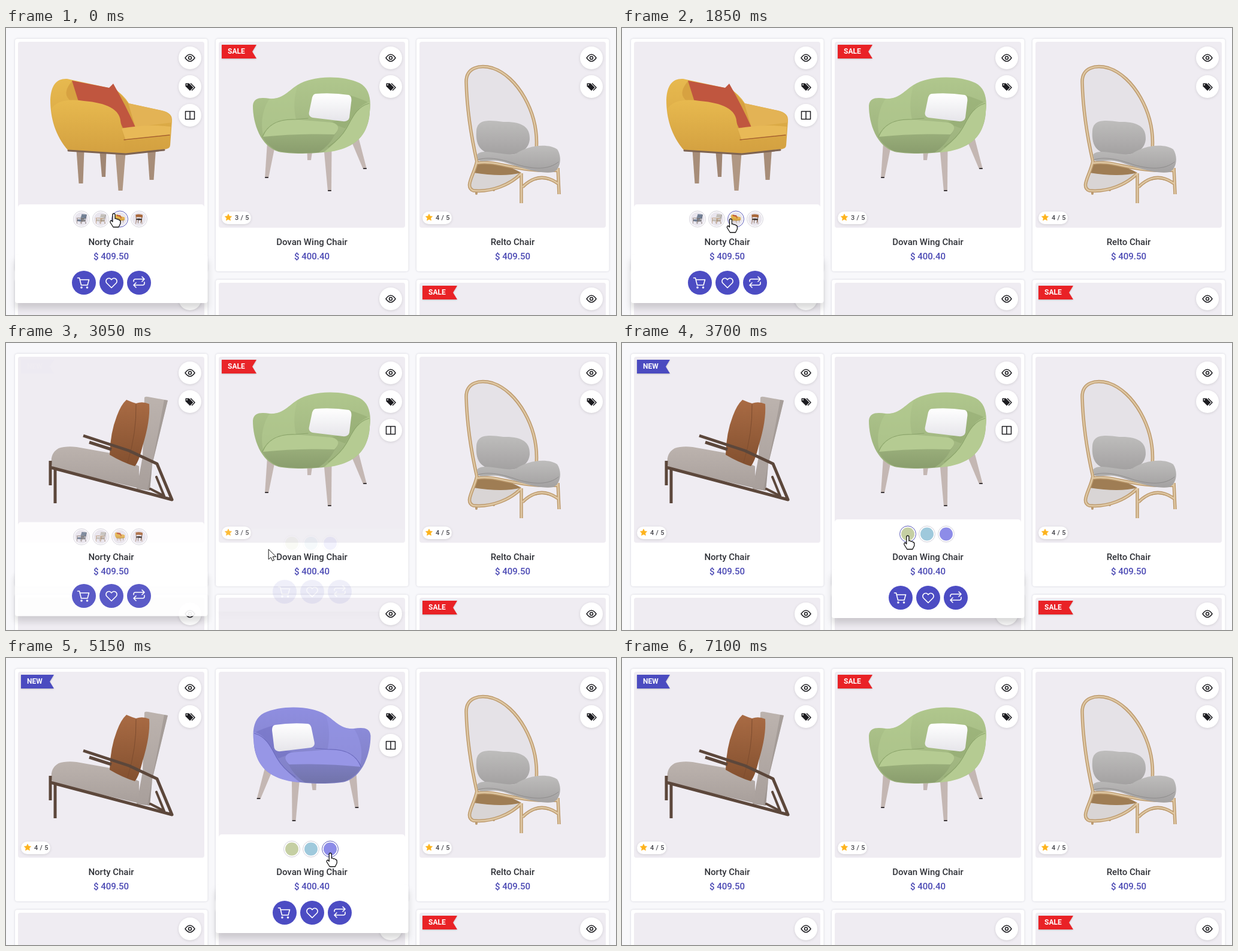
These frames come from a looping animation (1018 by 480 pixels, 7150 ms). An HTML page:

```html
<!DOCTYPE html>
<html lang="en">
<head>
<meta charset="utf-8">
<title>Chair shop</title>
<style>
html, body { margin: 0; width: 100%; height: 100%; overflow: hidden; background: #f8f8fb; }
svg { display: block; font-family: Roboto, Arial, sans-serif; font-weight: 500; }
.card { fill: #fff; filter: drop-shadow(0 0 1.5px rgba(40,40,70,.2)); }
.photo { fill: #efecf2; }
.round { fill: #fff; filter: drop-shadow(0 1px 2px rgba(0,0,0,.12)); }
.sheet { fill: #fff; filter: drop-shadow(0 9px 6px rgba(0,0,0,.15)); }
.line { fill: none; stroke: #1c1c20; stroke-width: 1.5; stroke-linejoin: round; }
.white { fill: none; stroke: #fff; stroke-width: 1.6; stroke-linecap: round; stroke-linejoin: round; }
.ribbon text { font-size: 12px; font-weight: 700; fill: #fff; }
.ribbon path { filter: drop-shadow(0 1px 1px rgba(0,0,0,.2)); }
.label { font-size: 15px; text-anchor: middle; fill: #303238; }
.price { fill: #4b49b4; }
.score { font-size: 11px; fill: #45454b; letter-spacing: .3px; }
</style>
</head>
<body>
<svg id="stage" width="1018" height="480" viewBox="0 0 1018 480"></svg>
<script>
const LOOP = 7150;
const path = (d, fill, extra = '') => `<path d="${d}" fill="${fill}" ${extra}/>`;
const stroke = (d, color, width, cap = 'round') =>
  path(d, 'none', `stroke="${color}" stroke-width="${width}" stroke-linejoin="round" stroke-linecap="${cap}"`);
const leg = (x1, y1, w1, x2, y2, w2, fill) =>
  path(`M${x1 - w1 / 2} ${y1}h${w1}L${x2 + w2 / 2} ${y2}h${-w2}z`, fill);
const grad = (id, a, b, dir = 'x2="0" y2="1"') =>
  `<linearGradient id="${id}" ${dir}><stop stop-color="${a}"/><stop offset="1" stop-color="${b}"/></linearGradient>`;
const group = (id, body, extra = '') => `<g id="${id}" ${extra}>${body}</g>`;
const textured = (d, fill, texture) => path(d, fill) + path(d, `url(#${texture})`);

// Chairs, drawn at their place on the stage
const lounge = () =>
  path('M231 91Q233 89 237 90L270 96 244 203 240 247 218 244 228 190z', 'url(#fabric)') +
  path('M264 95L270 96 244 203 240 247 236 246z', '#948b88', 'opacity=".5"') +
  stroke('M251 224L264 256 241 244', '#5c473b', 4) +
  path('M76 200Q74 184 88 176Q100 172 118 174L174 184Q205 198 222 206V243L85 211Q76 209 76 200z', 'url(#fabric)') +
  path('M201 95Q210 99 217 101Q228 97 239 102Q241 130 228 172Q222 198 215 206Q195 200 173 187Q174 150 185 122Q192 103 201 95z', 'url(#leather)') +
  stroke('M217 103Q218 150 203 200', '#7d4c2f', 1) +
  stroke('M139 166L176 178M129 155L205 180 252 202 277 262 74 208M74 197V238M82 210V268', '#5c473b', 5, 'butt');

const armchair = (cloth, soft, wood, dark) =>
  stroke('M280 93L262 180 251 226 264 278M150 228L165 276', dark, 6, 'butt') +
  textured('M182 76L276 82Q283 84 281 92L264 172 160 168 178 82Q179 76 182 76z', cloth, 'weave') +
  path('M276 82Q284 84 282 92L266 172 258 171z', '#39465c', 'opacity=".4"') +
  textured('M162 128Q198 136 238 137Q237 165 230 190Q190 191 158 181Q158 150 162 128z', soft, 'weave') +
  stroke('M158 181Q156 150 162 128Q198 136 238 137L232 165', '#4b596e', 1) +
  textured('M84 192Q90 185 112 185L178 187 256 190 251 229 178 231 88 223Q81 208 84 192z', cloth, 'weave') +
  path('M186 193L256 191 251 229 180 231z', '#9c8570', 'opacity=".45"') +
  leg(88, 160, 13, 79, 279, 6, wood) + leg(184, 164, 17, 174, 279, 7, wood) +
  leg(181, 178, 3, 172, 279, 2, dark) + leg(263, 230, 1, 264, 279, 6, dark) +
  path('M68 157Q74 151 128 152L163 157 150 164Q98 157 70 162z', wood) +
  path('M162 163Q200 155 250 161Q249 170 236 173Q200 168 162 167z', wood) +
  stroke('M69 161Q100 156 150 164M163 167Q200 168 236 172', dark, 1.5);

const sunny = () =>
  leg(124, 204, 13, 125, 260, 7, '#a78d79') + leg(162, 208, 11, 163, 249, 6, '#a08673') +
  leg(191, 209, 17, 191, 272, 7, '#b09783') + leg(243, 203, 14, 243, 254, 7, '#a78d79') +
  path('M74 120C75 95 85 84 102 85L180 102Q195 110 205 126L255 137Q278 140 277 155L274 196Q274 203 262 203L200 211 104 205C82 180 74 150 74 120z', 'url(#gold)') +
  path('M110 89L185 104 204 126 222 166 195 170Q160 128 108 122Q92 110 110 89z', '#d7a241') +
  path('M110 88L172 100 179 93Q200 130 216 166L195 167 185 145Q150 125 121 123z', '#c0563f') +
  path('M204 126L255 137Q277 141 277 158L216 166z', '#e3b355') +
  path('M193 168Q240 160 275 165L274 179 200 188z', '#e8b957') +
  stroke('M197 187L273 179', '#a5602f', 1.5) +
  path('M76 135Q88 116 130 122Q188 127 191 155L200 211 104 205Q80 175 76 135z', 'url(#gold)') +
  stroke('M104 205L200 211 264 204', '#7d6352', 3);

const diner = () =>
  leg(120, 185, 12, 108, 280, 7, '#7d4f30') + leg(225, 185, 12, 238, 280, 7, '#7d4f30') +
  leg(160, 195, 12, 155, 270, 7, '#5d3b26') + leg(245, 110, 12, 205, 265, 7, '#5d3b26') +
  path('M104 86Q175 70 250 92L244 146Q175 130 110 140z', '#a9683a') +
  path('M110 172Q175 155 240 174L232 198Q170 208 112 192z', '#3a3230') +
  leg(112, 130, 9, 118, 180, 9, '#7d4f30');

const wing = (main, light, dark, wood) => {
  const shell = 'M412 130C413 116 425 116 440 118C462 120 472 104 487 95C510 80 560 78 590 92C606 100 610 120 607 140C606 165 595 185 575 196C545 212 480 212 455 207C425 198 412 160 412 130z';
  return leg(443, 192, 14, 435, 251, 6, wood) + leg(507, 204, 9, 506, 221, 6, wood) +
    leg(537, 202, 13, 540, 273, 6, wood) + leg(582, 186, 14, 599, 236, 6, wood) +
    stroke('M433 250h4M538 272h4M597 235h4', '#3a3538', 2) +
    path(shell, main) + path(shell, 'url(#shade)') +
    path('M440 118C462 120 472 104 487 95C480 115 480 135 484 153C455 152 440 162 430 182C424 160 428 135 440 118z', light, 'opacity=".6"') +
    path('M572 112Q592 118 604 124C585 132 578 150 566 168L540 158 573 150z', dark, 'opacity=".45"') +
    path('M428 182C436 162 455 152 482 153L545 158Q562 164 548 180Q540 196 522 208Q480 211 455 206Q436 198 428 182z', 'url(#shade)') +
    path('M428 182C436 162 455 152 482 153L545 158Q562 164 548 178Q490 176 428 182z', light) +
    path('M607 124C585 131 578 150 568 168C556 186 545 196 530 208C565 206 590 192 600 170C607 152 608 138 607 124z', light) +
    stroke('M428 182C436 162 455 152 482 153L504 151M606 126C585 132 578 150 568 168C560 182 548 192 538 199', dark, 1.2) +
    path('M517 110Q545 108 572 112Q578 114 576 125L573 150Q571 157 562 156L512 150Q504 148 506 140L511 116Q513 110 517 110z', 'url(#linen)');
};

const rattan = () => {
  const hoop = 'M786 224C776 180 769 130 768 90C768 66 790 61 812 67C852 80 890 140 885 204';
  const loop = 'M786 222C782 245 764 266 780 272C810 275 842 262 860 243';
  const rail = 'M786 226C820 220 850 242 921 238';
  const feet = 'M860 243V293M921 234L923 278M862 266Q890 238 921 260';
  const cane = [hoop, loop, rail, feet].join('');
  return stroke('M785 270v7M814 267v4', '#bb9a70', 4) +
    path(hoop, '#e5e2e7') + path(loop, '#d9d5d5') +
    path('M786 226Q815 218 860 242Q830 250 780 242z', '#9f7d54') +
    path('M785 172C787 152 805 154 830 157C860 156 875 165 874 186C872 208 850 214 825 212C795 212 783 200 785 172z', 'url(#grey)') +
    stroke(cane, '#bd9a6d', 5.5, 'butt') + stroke(cane, '#dfc8a4', 2.5, 'butt') +
    path('M786 212C795 200 830 214 850 211C870 196 905 192 920 203C928 215 926 235 914 241C890 245 855 232 830 224C810 218 795 226 788 221z', 'url(#grey)') +
    stroke('M788 220C810 214 835 222 855 229C880 236 905 238 922 224', '#8f8d8d', 1);
};

const flip = 'transform="matrix(-1 0 0 1 1020.5 0)"';
const defs = `<defs>
  ${grad('fabric', '#bcb3ae', '#a89f9b')}${grad('leather', '#a96b44', '#83502f')}
  ${grad('gold', '#e7b94f', '#d3a040')}${grad('linen', '#fff', '#e6e5ea')}${grad('grey', '#bebdbc', '#a3a1a1')}
  ${grad('denim', '#77869b', '#66758c')}${grad('cushion', '#8491a4', '#687689')}
  ${grad('shade', 'rgba(30,40,20,0)', 'rgba(30,40,20,.14)')}
  <pattern id="weave" width="7" height="9" patternUnits="userSpaceOnUse" patternTransform="rotate(4)">
    <path d="M1 0v5M4.500 4v5" stroke="#a08a80" opacity=".4"/><path d="M2.500 3v6M6 0v4" stroke="#485c7a" opacity=".4"/></pattern>
  ${group('lounge', lounge())}${group('sunny', sunny())}${group('diner', diner())}${group('rattan', rattan())}
  ${group('denimChair', armchair('url(#denim)', 'url(#cushion)', '#84736a', '#5d4f49'))}
  ${group('creamChair', armchair('#c9c4bc', '#dfdad3', '#b58e68', '#8d6a4b'))}
  ${group('green', wing('#b0c78d', '#b5cb92', '#8ca56b', '#c4b7b3'))}
  ${group('blue', wing('#8bbbd8', '#92c2de', '#6296b8', '#b3cdbf'), flip)}
  ${group('purple', wing('#8f8ee0', '#9796e6', '#6a69bd', '#c4b7b3'), flip)}
  <path id="eye" class="line" d="M-8 0Q0-11.500 8 0Q0 11.500-8 0zM2.500 0A2.500 2.500 0 1 1-2.500 0A2.500 2.500 0 1 1 2.500 0z"/>
  <g id="tags"><path d="M-7.500-5.500h6l7 7-5.500 5.500-7.500-7.500z" fill="#1c1c20"/><circle cx="-5" cy="-3" r="1.100" fill="#fff"/>
    <path class="line" d="M1-5.500l7 7-5 5"/></g>
  <path id="columns" class="line" d="M-7.500-6.500h15v13h-15zM0-6.500v13"/>
  <path id="cart" class="white" d="M-10.500-8h3l3 12H6l2.500-9H-6.500M-3 8a1 1 0 1 1-2 0a1 1 0 1 1 2 0M6.500 8a1 1 0 1 1-2 0a1 1 0 1 1 2 0"/>
  <path id="heart" class="white" d="M0 8.500L-8 .5C-12-5-4-11 0-5C4-11 12-5 8 .5z"/>
  <path id="repeat" class="white" d="M-9-2v-1q0-3 3-3H8M5-10l4 4-4 4M9-1v2q0 3-3 3H-8M-5 0l-4 4 4 4"/>
</defs>`;

const cards = [
  { x: 15, name: 'Norty Chair', price: '409.50', score: 4, tag: 'NEW', photo: 'lounge',
    picks: ['denimChair', 'creamChair', 'sunny', 'diner'], open: [-1000, 3000] },
  { x: 350, name: 'Dovan Wing Chair', price: '400.40', score: 3, tag: 'SALE', photo: 'green',
    picks: ['green', 'blue', 'purple'], swatches: ['#c5cfa3', '#9fc9dc', '#8d8ce8'], open: [3000, 5660] },
  { x: 685, name: 'Relto Chair', price: '409.50', score: 4, photo: 'rattan',
    picks: ['denimChair', 'creamChair', 'diner', 'sunny'], open: [5660, 6200] }
];
const thumbX = (c, i) => c.x + 159 + (i - (c.picks.length - 1) / 2) * 32;

const icon = (x, y, id, key = '') =>
  `<g ${key} transform="translate(${x} ${y})"><circle class="round" r="19"/><use href="#${id}"/></g>`;
const ribbon = (x, y, tag) => {
  const w = tag === 'NEW' ? 55 : 58;
  return `<g class="ribbon"><path d="M${x} ${y}h${w}l-7 11.500 7 11.500h${-w}z" fill="${tag === 'NEW' ? '#4b4bc0' : '#e92226'}"/>
    <text x="${x + 10}" y="${y + 15}">${tag}</text></g>`;
};
const base = (x, y) => `<rect class="card" x="${x}" y="${y}" width="321.500" height="389" rx="4"/>
  <rect class="photo" x="${x + 5}" y="${y + 5}" width="311" height="311" rx="4"/>`;
const star = (x, y) => {
  const pts = Array.from({ length: 10 }, (_, i) => {
    const r = i % 2 ? 2.9 : 6, a = i * Math.PI / 5;
    return [x + r * Math.sin(a), y - r * Math.cos(a)];
  });
  return `<polygon points="${pts.join(' ')}" fill="#fdb31c" stroke="#fdb31c" stroke-width=".6" stroke-linejoin="round"/>`;
};

const shelf = (c, i) => base(c.x, 18) + `<use id="photo${i}"/>` +
  icon(c.x + 292, 50, 'eye') + icon(c.x + 292, 98, 'tags') + icon(c.x + 292, 146, 'columns', `id="extra${i}"`) +
  `<g id="badge${i}">${c.tag ? ribbon(c.x + 10, 28, c.tag) : ''}
    <rect class="round" x="${c.x + 10}" y="307" width="49" height="21" rx="10.500"/>${star(c.x + 21, 317)}
    <text class="score" x="${c.x + 32}" y="321">${c.score} / 5</text></g>`;
const lowerCard = (c, i) => base(c.x, 421) + icon(c.x + 292, 453, 'eye') + (i === 2 ? ribbon(c.x + 10, 431, 'SALE') : '');
const thumb = (c, id, i, n) => `<g transform="translate(${thumbX(c, i)} 319.500)">
  <circle id="ring${n}_${i}" r="13.500" fill="#fff"/>` + (c.swatches
    ? `<circle r="11" fill="${c.swatches[i]}"/>`
    : `<circle r="11.500" fill="#e9e6ee"/><use href="#${id}" transform="scale(.08) translate(-175 -178)"/>`) + '</g>';
const panel = (c, i) => `<rect id="sheet${i}" class="sheet" x="${c.x}" y="380" width="321.500" rx="4"/>
  <g id="top${i}"><rect x="${c.x + 5}" y="295" width="311" height="85" rx="5" fill="#fff"/>
    ${c.picks.map((id, k) => thumb(c, id, k, i)).join('')}</g>
  <text class="label" x="${c.x + 160.5}" y="363">${c.name}</text>
  <text class="label price" x="${c.x + 160.5}" y="387">$ ${c.price}</text>
  <g id="actions${i}">${['cart', 'heart', 'repeat'].map((id, k) =>
    `<g transform="translate(${c.x + 115 + k * 46} 426)"><circle r="20" fill="#4c4cc3"/><use href="#${id}"/></g>`).join('')}</g>`;

const pointers = `<g id="pointer" stroke="#111" fill="#fff" stroke-linejoin="round">
  <path id="arrow" d="M0 0V17L4 13.500 6.500 19.500 9.500 18 7 12.500H12.500z"/>
  <path id="hand" stroke-width="1.300" d="M-2 1.500Q0-1 2 1.500V9Q4 8 5.500 10Q7.500 9 8.500 11Q11 11 11 14V17L8 23H-1L-6 15Q-6.500 12-4 12L-2 14z"/>
  <path id="beam" fill="none" d="M-3-7.500h2.500l.5 1 .5-1H3M0-7v14M-3 7.500h2.500l.5-1 .5 1H3"/></g>`;

document.getElementById('stage').innerHTML = defs + cards.map(lowerCard).join('') +
  cards.map(shelf).join('') + cards.map(panel).join('') + pointers;

const el = {};
document.querySelectorAll('[id]').forEach(node => el[node.id] = node);
const set = (id, attrs) => { for (const k in attrs) el[id].setAttribute(k, attrs[k]); };
const show = (id, on) => set(id, { visibility: on ? 'visible' : 'hidden' });

// Pointer route: time, x, y
const route = [
  [0, 180, 310], [300, 160, 314], [500, 158, 316], [800, 136, 317], [1050, 138, 317], [1300, 156, 318],
  [1500, 158, 318], [1750, 181, 319], [2000, 182, 319], [2250, 220, 320], [2600, 222, 322], [2900, 290, 332],
  [3000, 348, 338], [3050, 438, 345], [3300, 474, 322], [4150, 480, 322], [4350, 508, 327], [4700, 510, 327],
  [4900, 540, 326], [5300, 542, 326], [5550, 620, 345], [5660, 690, 360], [5800, 835, 379], [6000, 900, 350],
  [6200, 1000, 300]
];
// Chosen thumbnail: time, index
const choices = [[0, 2], [120, 1], [745, 0], [1140, 1], [1700, 2], [2130, 3], [3000, -1],
  [3200, 0], [4260, 1], [4820, 2], [5660, -1]];

const slide = u => 1 - (1 - u ** 1.4) ** 3;
const appear = u => slide(u) ** 1.5;

function progress(t, [a, b], span, curve) {
  if (t < a) return 0;
  const u = Math.min((t - (t < b ? a : b)) / span, 1);
  return t < b ? curve(u) : 1 - curve(u);
}

function pointerAt(t) {
  const k = Math.max(1, route.findIndex(p => p[0] > t));
  const [t0, x0, y0] = route[k - 1], [t1, x1, y1] = route[k];
  const u = (t - t0) / (t1 - t0);
  return [x0 + (x1 - x0) * u, y0 + (y1 - y0) * u];
}

function drawPointer(t, card, choice) {
  let kind = '';
  if (card) {
    const [x, y] = pointerAt(t), mid = Math.abs(x - card.x - 160.5);
    set('pointer', { transform: `translate(${x} ${y})` });
    const overText = mid < 60 && y > 348 && y < 368 || mid < 31 && y > 372 && y < 392;
    const overThumb = choice >= 0 && Math.hypot(x - thumbX(card, choice), y - 319.5) < 16;
    kind = overThumb ? 'hand' : overText ? 'beam' : 'arrow';
  }
  for (const id of ['arrow', 'hand', 'beam']) show(id, id === kind);
}

function draw(t) {
  const choice = choices.filter(c => c[0] <= t).pop()[1];
  cards.forEach((c, i) => {
    const over = t >= c.open[0] && t < c.open[1];
    const gap = 1 - progress(t, c.open, 300, slide);
    const fade = progress(t, c.open, 350, u => u ** 1.3);
    show('extra' + i, over);
    set('photo' + i, { href: '#' + (over && choice >= 0 ? c.picks[choice] : c.photo) });
    set('badge' + i, { opacity: 1 - progress(t, c.open, 300, u => u ** 2.4) });
    set('sheet' + i, { height: 80 - 14 * gap, opacity: fade });
    set('top' + i, { opacity: progress(t, c.open, 300, appear), transform: `translate(0 ${20 * gap})` });
    set('actions' + i, { opacity: fade, transform: `translate(0 ${-13 * gap})` });
    c.picks.forEach((_, k) => set(`ring${i}_${k}`, { stroke: over && k === choice ? '#5a59b8' : '#d3d1da' }));
  });
  drawPointer(t, cards.find(c => t >= c.open[0] && t < c.open[1]), choice);
}

const start = performance.now();
function tick() {
  draw((performance.now() - start) % LOOP);
  requestAnimationFrame(tick);
}
tick();
</script>
</body>
</html>
```
